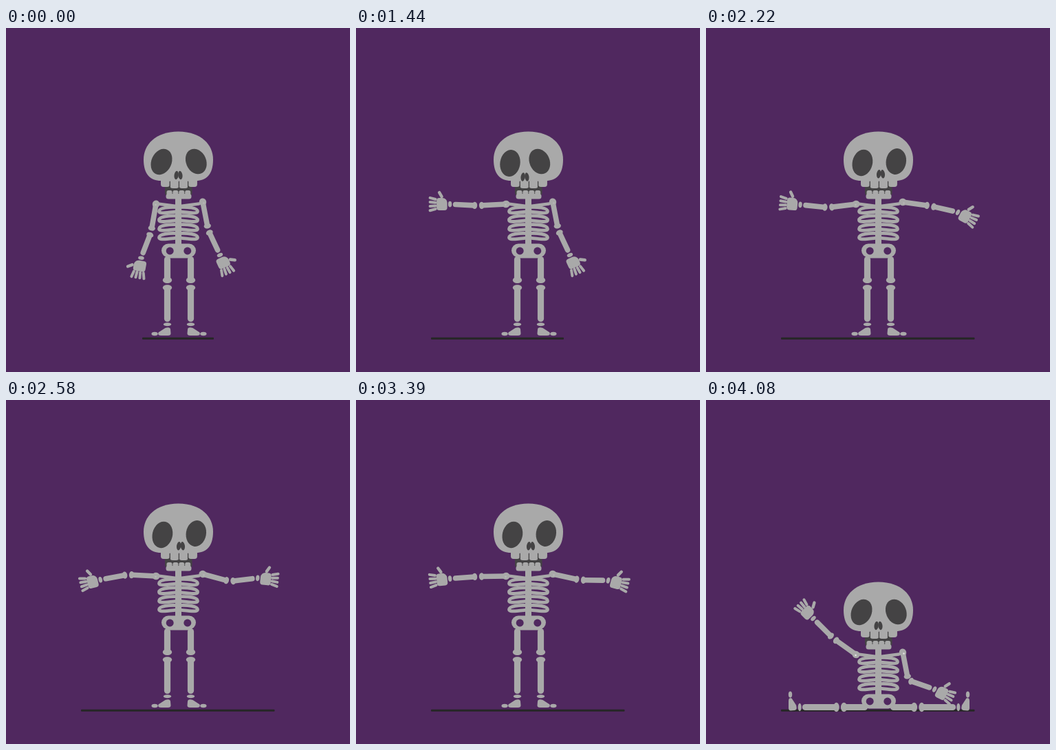
Recreate the animation shown at these times as an HTML page with a canvas. Size 500x500 px, loop 4.56 s.

```html
<!DOCTYPE html>
<html lang="en">
<head>
<meta charset="utf-8">
<title>Dancing skeleton</title>
<style>
html, body { margin: 0; width: 100%; height: 100%; overflow: hidden; background: #50285f; }
canvas { display: block; width: 500px; height: 500px; }
</style>
</head>
<body>
<canvas id="stage" width="500" height="500"></canvas>
<script>
const ctx = document.getElementById('stage').getContext('2d');
const LOOP = 4560;
const BACK = '#50285f', BONE = '#a9a9a9', DARK = '#444344', FLOOR = '#262626';

const rad = deg => deg * Math.PI / 180;

// Smooth 0..1 progress of time t between two moments.
function ease(t, from, to) {
  const p = Math.min(1, Math.max(0, (t - from) / (to - from)));
  return p * p * (3 - 2 * p);
}

const blend = (a, b, p) => a.map((v, i) => v + (b[i] - v) * p);

function phases(t) {
  return {
    raiseLeft: ease(t, 810, 1140),
    raiseRight: ease(t, 1850, 2200),
    faceLeft: ease(t, 900, 1140),
    faceRight: ease(t, 1800, 2200),
    jump: ease(t, 3480, 3720),
    fall: ease(t, 3780, 4080),
    swing: Math.cos(2 * Math.PI * (t - 2940) / 1440),
    tap: t < 1080 ? Math.sin(Math.PI * t / 360) ** 2 : 0
  };
}

// Arm poses are [upper arm, forearm, hand] in degrees.
function leftPose(t, { raiseLeft, jump, swing }) {
  const wave = [183 + 10 * swing, 169.5 - 16.5 * swing, 166 - 19 * swing];
  const raised = blend([100, 111, 100], [177, 183, 180], raiseLeft);
  return blend(blend(raised, wave, ease(t, 1440, 2000)), [215.5, 225, 226], jump);
}

function rightPose({ raiseRight, jump, fall, swing }) {
  const wave = [15 + 7 * swing, -7 - 20 * swing, 6 - 22 * swing];
  const raised = blend([79, 65, 66], wave, raiseRight);
  return blend(raised, [79, 45 - 26 * fall, 52 - 25 * fall], jump);
}

function oval(x, y, rx, ry, color = BONE, tilt = 0) {
  ctx.fillStyle = color;
  ctx.beginPath();
  ctx.ellipse(x, y, rx, ry, rad(tilt), 0, Math.PI * 2);
  ctx.fill();
}

function line(x1, y1, x2, y2, width, color = BONE) {
  ctx.strokeStyle = color;
  ctx.lineWidth = width;
  ctx.beginPath();
  ctx.moveTo(x1, y1);
  ctx.lineTo(x2, y2);
  ctx.stroke();
}

function box(x, y, w, h, radius, color = BONE) {
  ctx.fillStyle = color;
  ctx.beginPath();
  ctx.roundRect(x, y, w, h, radius);
  ctx.fill();
}

function shape(path) {
  ctx.fillStyle = BONE;
  ctx.fill(new Path2D(path));
}

function placed(x, y, angle, draw, flipX = 1, flipY = 1) {
  ctx.save();
  ctx.translate(x, y);
  ctx.scale(flipX, 1);
  ctx.rotate(rad(angle));
  ctx.scale(1, flipY);
  draw();
  ctx.restore();
}

function drawHand() {
  oval(0.5, 0, 2.7, 4.4);
  box(4.5, -9, 15.5, 18, [4, 4, 4, 7]);
  for (let i = -1.5; i <= 1.5; i++) line(21.5, i * 4.7, 29.5, i * 6.1, 4);
  line(12.5, 11, 16, 17, 4.4);
}

function drawArm(x, y, [upper, fore, hand], side) {
  const ex = x + 41 * Math.cos(rad(upper)), ey = y + 41 * Math.sin(rad(upper));
  const wx = ex + 40 * Math.cos(rad(fore)), wy = ey + 40 * Math.sin(rad(fore));
  placed(x, y, upper, () => {
    oval(0, 0, 5.6, 5.2);
    line(0, 0, 34, 0, 7.6);
    oval(35.5, 0, 3.7, 5.2);
  });
  placed(ex, ey, fore, () => {
    oval(4.5, 0, 3.7, 5.2);
    line(5, 0, 32.5, 0, 7.6);
  });
  placed(wx, wy, hand, drawHand, 1, side);
}

function drawLeg(x, y, spread, flip, tap) {
  placed(x, y, spread, () => {
    line(0, 4, 0, 32, 9.2);
    oval(0, 34, 6.7, 4.6);
    oval(0, 45, 6.7, 4.2);
    line(0, 46, 0, 90, 9.2);
    oval(0, 98.3, 5.7, 2.5);
    placed(0, 99.5, tap, () => {
      shape('M-3 4Q4 2 4.5 6L5 12Q5 15 1 15L-9 15Q-14.5 15-13 10.5Z');
      oval(-18.4, 12.5, 4.6, 2.7);
    });
  }, flip);
}

function drawTorso() {
  line(250.5, 246, 250.5, 318, 9);
  for (const side of [-1, 1]) {
    line(250.5 + side * 3, 259, 250.5 + side * 30, 255.5, 4.4);
    for (let i = 0; i < 4; i++) {
      placed(250.5, 260.5 + i * 12.7, 0, () => {
        ctx.strokeStyle = BONE;
        ctx.lineWidth = 4.8;
        ctx.stroke(new Path2D('M0 0C14-1 28 1 28 6C28 10 14 8 0 6'));
      }, side);
    }
  }
  box(226, 313.5, 50, 20, 10);
  box(231, 320, 40, 14.5, 6);
  for (const side of [-1, 1]) oval(251 + side * 12.8, 324, 5.5, 5.4, BACK);
}

function drawFace({ faceLeft, faceRight, jump, fall }) {
  const left = faceLeft * (1 - faceRight), right = faceRight * (1 - jump);
  const look = 3.5 * right - 5 * left;
  const squash = jump * (1 - fall);
  const turn = Math.abs(look);
  const height = 19.5 - 3 * squash, width = 14.6 - squash;
  oval(226 + 0.4 * look, 194.5 + 0.4 * turn, width, height, DARK, 24 - 3 * turn + 42 * squash);
  oval(276.3 - 9.5 * left, 194, width, height - 0.5, DARK, -24 + 34 * right - 42 * squash);
  for (const side of [-1, 1]) {
    oval(250.5 + look + side * 2.9, 214 - 0.5 * look, 3.1, 6.2, DARK, -7 * side);
  }
}

function drawHead(phase) {
  box(231, 226, 39.5, 17, 3, DARK);
  box(232.5, 241, 37, 7.5, 3.5);
  for (let i = 0; i < 4; i++) box(233.5 + i * 8.9, 236, 8, 9, 2.5);

  shape('M250.5 150.5C284 150.5 301 170 301 191C301 213 291 222 276 222L225 222C210 222 200 213 200 191C200 170 217 150.5 250.5 150.5Z');
  for (let i = 0; i < 4; i++) {
    const height = i % 3 ? 17 : 15;
    box(225 + i * 13.25, 216, 13.2, height, [0, 0, 4, 4]);
    if (i) line(225 + i * 13.2, 223.5, 225 + i * 13.2, 231, 1.3, DARK);
  }
  drawFace(phase);
}

function render(t) {
  const phase = phases(t);
  const { raiseLeft, raiseRight, jump, fall, tap } = phase;
  ctx.fillStyle = BACK;
  ctx.fillRect(0, 0, 500, 500);
  ctx.lineCap = 'round';
  ctx.lineJoin = 'round';

  const inset = 39 * (jump - fall);
  const from = 198 - 89 * raiseLeft + inset;
  const to = 302 + 88.5 * raiseRight - inset;
  box(from, 449.8, to - from, 3, 1, FLOOR);

  const spread = 40 * jump + 50 * fall;
  ctx.save();
  ctx.translate(2 * (jump - fall), 167 * fall - 53 * jump);
  drawLeg(234.5, 332.5, spread, 1, 24 * tap);
  drawLeg(268.5, 332.5, spread, -1, 0);
  drawTorso();
  drawArm(218, 256, leftPose(t, phase), 1);
  drawArm(286, 253, rightPose(phase), -1);
  const glint = t > 3600 ? '#e4e4e4' : '#b8b8b8';
  oval(217.5, 257, 1.3, 1.3, glint);
  oval(287.5, 254.5, 1.3, 1.3, glint);
  ctx.translate(0, -tap);
  drawHead(phase);
  ctx.restore();
}

const start = performance.now();
function tick() {
  const t = (performance.now() - start) % LOOP;
  render(Math.floor(t / 30) * 30);
  requestAnimationFrame(tick);
}
tick();
</script>
</body>
</html>
```
